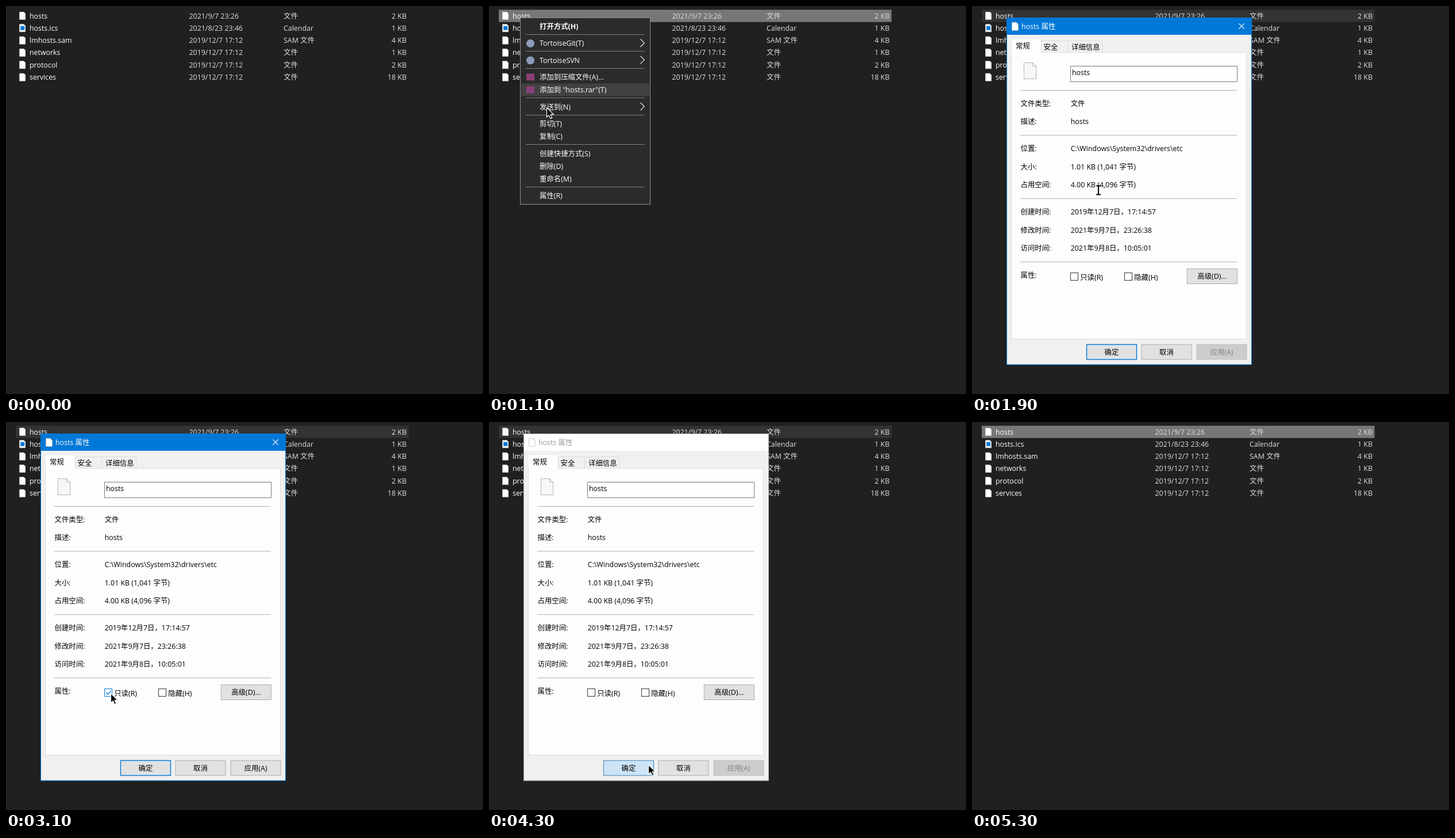
These frames come from a looping animation (830x674 px, 5500 ms). An HTML page:

```html
<!DOCTYPE html>
<html lang="zh-CN">
<head>
<meta charset="utf-8">
<style>
html, body { margin: 0; width: 830px; height: 674px; overflow: hidden; background: #202020; }
svg { display: block; }
text { font: 12.4px "Open Sans", "Noto Sans CJK SC", "Noto Sans CJK", sans-serif; white-space: pre; }
.bold { font-weight: 700; }
</style>
</head>
<body>
<svg id="stage" width="830" height="674" viewBox="0 0 830 674"></svg>
<script>
const rect = (x, y, w, h, fill, more = '') =>
  `<rect x="${x}" y="${y}" width="${w}" height="${h}" fill="${fill}" ${more}/>`;
const stroke = (d, color, width = 1, more = '') =>
  `<path d="${d}" fill="none" stroke="${color}" stroke-width="${width}" ${more}/>`;
const rule = (x1, x2, y, color) => stroke(`M${x1} ${Math.floor(y) + .5}H${x2}`, color);
// Text is placed by the vertical centre of its capitals.
const text = (x, y, s, fill, more = '') =>
  `<text x="${x}" y="${y + 4.5}" fill="${fill}" ${more}>${s}</text>`;
const group = (id, inner) => `<g id="${id}">${inner}</g>`;
const page = (x, y, w, h, fold, fill, edge) =>
  `<path d="M${x} ${y}h${w - fold}l${fold} ${fold}v${h - fold}h${-w}z" fill="${fill}" stroke="${edge}" stroke-width=".7"/>` +
  stroke(`M${x + w - fold} ${y}v${fold}h${fold}`, edge, .7);

const ROW = 21.33;
const old = '2019/12/7 17:12';
const files = [
  ['hosts', '2021/9/7 23:26', '文件', 2],
  ['hosts.ics', '2021/8/23 23:46', 'Calendar', 1],
  ['lmhosts.sam', old, 'SAM 文件', 4],
  ['networks', old, '文件', 1],
  ['protocol', old, '文件', 2],
  ['services', old, '文件', 18]
];

function drawList() {
  const rows = files.map(([name, date, type, size], i) => {
    const y = 17 + i * ROW;
    return page(23.6, y - 6.5, 10, 13, 2.5, '#fff', '#ddd') +
      (name.endsWith('.ics') ? rect(25.2, y - 3.5, 7, 7, '#0078d7') : '') +
      text(41, y, name, '#fff') + text(318.5, y, date, '#dedede') +
      text(483, y, type, '#dedede') + text(697, y, size + ' KB', '#dedede', 'text-anchor="end"');
  });
  return rect(0, 0, 1, 674, '#2c2c2c') + rect(17, 0, 683.5, ROW, '#777', 'id="rowMark"') + rows.join('');
}

// Each inner list is a block between two separators.
const ITEM = 22.2, GAP = 7.2;
const blocks = [
  ['打开方式(H)'], ['TortoiseGit(T)'], ['TortoiseSVN'],
  ['添加到压缩文件(A)...', '添加到 "hosts.rar"(T)'], ['发送到(N)'],
  ['剪切(T)', '复制(C)'], ['创建快捷方式(S)', '删除(D)', '重命名(M)'], ['属性(R)']
];
const items = blocks.flatMap((block, b) => block.map((label, i) => ({
  label, first: i === 0,
  y: 35.2 + b * GAP + (blocks.slice(0, b).flat().length + i) * ITEM
})));

function drawMenu() {
  const rows = items.map(({ label, first, y }, i) => {
    let out = text(88, y, label, '#fff', i ? '' : 'class="bold"');
    if (i && first) out += rule(64, 271, y - (ITEM + GAP) / 2 - .4, '#808080');
    if (/^Tortoise/.test(label)) out += `<circle cx="72" cy="${y + .5}" r="7" fill="#8b9cb8"/>`;
    if (/^添加/.test(label)) out += rect(65, y - 6, 14, 12, '#8a3f78');
    if (/^Tortoise|^发送/.test(label)) out += stroke(`M263.5 ${y - 7.2}l6.8 6.8-6.8 6.8`, '#fff', 1.1);
    return out;
  });
  return rect(54.5, 20.5, 226, 324, '#2b2b2b', 'stroke="#909090"') +
    rect(56, 0, 223, ITEM, '#414141', 'id="itemMark"') + rows.join('');
}

const fields = [
  [['文件类型:', '文件'], ['描述:', 'hosts']],
  [['位置:', 'C:\\Windows\\System32\\drivers\\etc'], ['大小:', '1.01 KB (1,041 字节)'], ['占用空间:', '4.00 KB (4,096 字节)']],
  [['创建时间:', '2019年12月7日，17:14:57'], ['修改时间:', '2021年9月7日，23:26:38'], ['访问时间:', '2021年9月8日，10:05:01']],
  [['属性:', '']]
];

function drawFields() {
  const step = 31.4;
  let y = 169.4, out = '';
  for (const block of fields) {
    out += rule(84, 461, y - 23.4, '#b4b4b4');
    for (const [label, value] of block) {
      out += text(84.5, y, label, '#000') + text(171.7, y, value, '#000');
      y += step;
    }
    y += step / 2;
  }
  return out;
}

const button = (id, x, y, label) => group(id,
  rect(x, y, 87, 26, '#e1e1e1', 'stroke="#adadad"') +
  text(x + 43.5, y + 13, label, '#000', 'text-anchor="middle"'));
const checkbox = (id, x, label) => group(id,
  rect(x, 463.5, 13, 13, '#fff', 'stroke="#333"') +
  stroke(`M${x + 2.5} 470l3 3.2 5.5-6.4`, '#0078d7', 1.3, 'opacity="0"') +
  text(x + 16.7, 471, label, '#000'));

function drawDialog() {
  const edge = 'stroke="#dcdcdc"';
  return rect(60.5, 20.5, 426, 602.5, '#f0f0f0', 'id="frame"') +
    rect(61, 21, 425, 29, '#0078d7', 'id="titleBar"') +
    page(69.5, 28.5, 11, 14, 3, '#fff', '#bbb') +
    text(86, 35.5, 'hosts 属性', '#fff', 'id="title"') +
    stroke('M464.3 30.3l9.6 9.6m0-9.6l-9.6 9.6', '#fff', 1.1, 'id="close"') +
    rect(120.5, 60.5, 46, 20, '#f0f0f0', edge) + rect(166.5, 60.5, 60, 20, '#f0f0f0', edge) +
    rect(68.5, 80.5, 409, 498, '#fdfdfd', edge) + rect(69, 57.5, 51, 24, '#fdfdfd') +
    text(76, 69.5, '常规', '#000') + text(124.5, 71.5, '安全', '#000') + text(173, 71.5, '详细信息', '#000') +
    page(90.5, 98.5, 21, 28, 6, '#f7f7f7', '#999') +
    rect(171.5, 104.5, 290, 27, '#fff', 'stroke="#7a7a7a"') + text(174, 115, 'hosts', '#000') +
    drawFields() +
    checkbox('readOnly', 171.5, '只读(R)') + checkbox('hidden', 265.5, '隐藏(H)') +
    button('advanced', 374.3, 456.5, '高级(D)...') + button('ok', 199.5, 588, '确定') +
    button('cancel', 295, 588, '取消') + button('apply', 391, 588, '应用(A)');
}

const last = items[items.length - 1];
document.getElementById('stage').innerHTML =
  group('list', drawList()) + group('menu', drawMenu()) + group('dialog', drawDialog()) +
  group('afterglow', rect(56, last.y - ITEM / 2, 223, ITEM + 1, '#414141') + text(88, last.y, last.label, '#fff')) +
  group('pointer',
    '<path id="arrow" d="M.5 .5V17L4.3 13.4 7 19.6 9.8 18.4 7.2 12.4H12.3Z" fill="#000" stroke="#fff" stroke-width="1.2"/>' +
    stroke('M-3.8-7.5h7.6M0-8V8M-3.8 7.5h7.6', '#000', 2, 'id="beam"'));

const $ = id => document.getElementById(id);
const set = (el, attrs) => { for (const k in attrs) el.setAttribute(k, attrs[k]); };
const show = (id, on) => set($(id), { visibility: on ? 'visible' : 'hidden' });
const ramp = (t, a, b) => Math.min(1, Math.max(0, (t - a) / (b - a)));

// Places where the pointer turns or rests: time, x, y
const stops = [
  [100, 108, 72], [600, 54, 20], [900, 54, 20], [1100, 100, 176], [1400, 112, 330],
  [1900, 220, 320], [2200, 233, 248], [2600, 182, 471], [3300, 182, 471],
  [3600, 352, 564], [3800, 277, 595], [4400, 277, 595], [5200, 813, 68]
];

function pointerAt(t) {
  let [, x, y] = stops[0];
  for (let i = 1; i < stops.length; i++) {
    const p = ramp(t, stops[i - 1][0], stops[i][0]);
    x += (stops[i][1] - stops[i - 1][1]) * p;
    y += (stops[i][2] - stops[i - 1][2]) * p;
  }
  return [x, y];
}

function render(t) {
  const within = (a, b) => t >= a && t < b;
  const [x, y] = pointerAt(t);

  const row = t < 900 ? Math.floor((y - 6.5) / ROW) : 0;
  set($('rowMark'), {
    y: 6.5 + row * ROW,
    fill: t < 900 ? '#4d4d4d' : within(1500, 4400) ? '#333' : '#777'
  });
  show('rowMark', t >= 100);

  // The highlight trails the pointer a little.
  show('menu', within(900, 1500));
  const trailing = pointerAt(t - 50)[1];
  const item = items.find(k => Math.abs(k.y - trailing) < ITEM / 2);
  set($('itemMark'), { y: item ? item.y - ITEM / 2 : 0, opacity: item ? 1 : 0 });

  const opening = ramp(t, 1500, 1900);
  const open = Math.min(opening, ramp(t, 4600, 4300) ** 2);
  set($('afterglow'), { opacity: t < 1500 ? 0 : (1 - opening) ** .7 });
  set($('dialog'), {
    opacity: open ** 1.15,
    transform: `translate(273.5 321.7) scale(${.942 + .058 * open}) translate(-273.5 -321.7)`
  });

  const active = t < 4300;
  set($('frame'), { stroke: active ? '#0078d7' : '#aaa' });
  set($('titleBar'), { fill: active ? '#0078d7' : '#fff' });
  set($('title'), { fill: active ? '#fff' : '#999' });
  set($('close'), { opacity: active ? 1 : 0 });

  const checked = within(2800, 3300);
  const [box, mark] = $('readOnly').children;
  set(box, { stroke: within(2600, 3400) ? '#0078d7' : '#333' });
  set(mark, { opacity: checked ? 1 : 0 });
  const [face, label] = $('apply').children;
  set(face, { fill: checked ? '#e1e1e1' : '#ccc', stroke: checked ? '#adadad' : '#bfbfbf' });
  set(label, { fill: checked ? '#000' : '#838383' });
  const pressed = t >= 4200;
  set($('ok').children[0], {
    fill: pressed ? '#cce4f7' : t >= 3800 ? '#e5f1fb' : '#e1e1e1',
    stroke: pressed ? '#3c7fb1' : '#0078d7',
    'stroke-width': pressed ? 1 : 1.4
  });

  const seen = within(100, 5300), overText = within(1700, 2400);
  show('beam', seen && overText);
  show('arrow', seen && !overText);
  set($('pointer'), { transform: `translate(${x} ${y})` });
}

function tick(now) {
  render(Math.floor(now % 5500 / 100) * 100);
  requestAnimationFrame(tick);
}
tick(performance.now());
</script>
</body>
</html>
```
